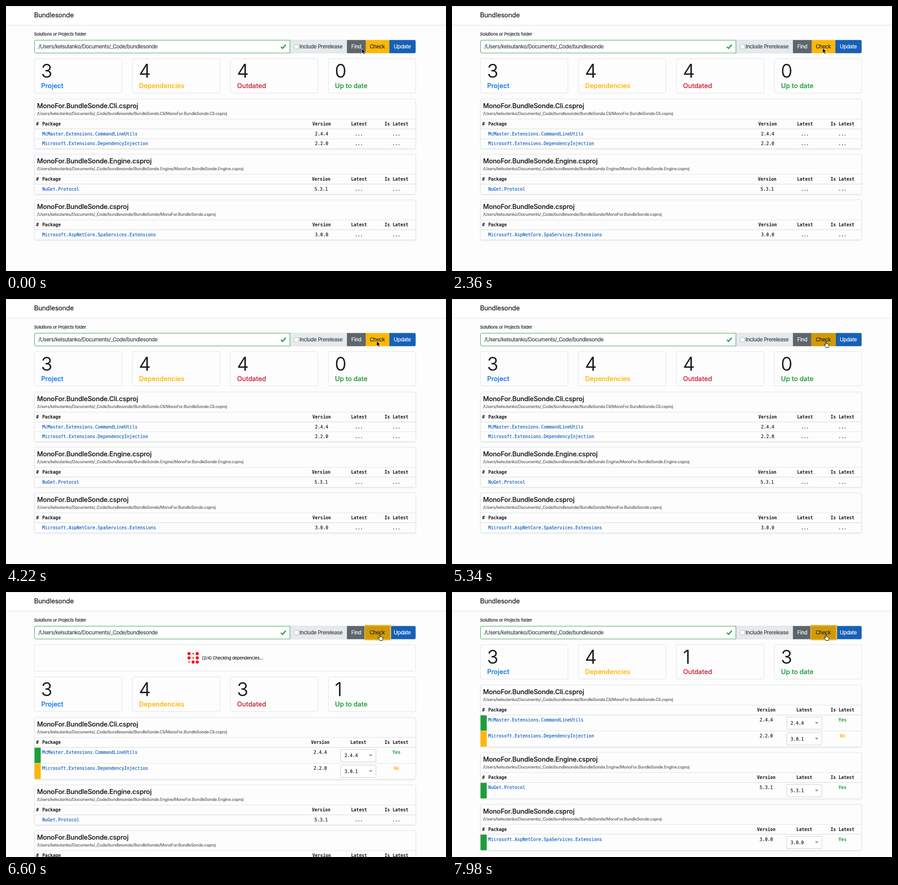
Animation, 964 px wide and 581 px high, one loop 8000 ms. Source, as an HTML page:

```html
<!DOCTYPE html>
<html lang="en">
<head>
<meta charset="utf-8">
<title>Bundlesonde</title>
<style>
html, body { margin: 0; width: 100%; height: 100%; overflow: hidden; background: #fdfdfd; }
svg { display: block; width: 964px; height: 581px; }
/* The hairline stroke gives the text the weight of smoothed screen type */
text {
  font-family: Inter, "Open Sans", sans-serif; white-space: pre;
  color: #16191d; fill: currentColor; stroke: currentColor; stroke-width: .2px;
}
.brand, .title, .name { font-size: 14.4px; letter-spacing: -.06px; }
.brand { letter-spacing: -.2px; }
.title { font-weight: 500; letter-spacing: -.12px; }
.name { font-weight: 500; letter-spacing: .02px; }
.small { font-size: 9.2px; letter-spacing: -.12px; }
.path { font-size: 9px; letter-spacing: -.17px; color: #596067; }
.ctl { font-size: 11.5px; letter-spacing: -.36px; color: #394047; }
.num { font-size: 41px; font-weight: 300; stroke-width: .4px; }
.mono { font-family: "DejaVu Sans Mono", monospace; font-size: 9.64px; }
.bold { font-weight: 700; stroke-width: 0; }
.mid { text-anchor: middle; }
.box { fill: none; stroke: #dee1e3; }
</style>
</head>
<body>
<svg viewBox="0 0 964 581">
  <defs>
    <filter id="soft" x="-5%" y="-20%" width="110%" height="150%">
      <feDropShadow dx="0" dy="1.5" stdDeviation="1.5" flood-opacity=".08"/>
    </filter>
  </defs>
  <rect width="964" height="581" fill="#fdfdfd"/>
  <g id="page"></g>
  <g id="spinner" fill="#fb0d14"></g>
  <g id="cursor">
    <path id="arrow" d="M0 0V11.6L2.7 9.1L4.6 13.3L6.6 12.4L4.7 8.3H8.3Z" fill="#000" stroke="#fff" stroke-width=".8"/>
    <path id="hand" d="M-.9 .9Q-.9 -.2 0 -.2T1 .9V4.6Q2.8 3.8 3.2 5Q4.7 4.4 5 5.6Q6.6 5.2 6.6 6.8V9Q6.5 10.3 5.6 11.3V13H0V11.7Q-2 9.8 -3.5 7.6Q-4 6.2 -2.7 6.2L-.9 7.5Z" fill="#fff" stroke="#000" stroke-width="1"/>
  </g>
</svg>
<script>
const LOOP = 8000, HOVER = 4700, CLICK = 6600, THIRD = 6940, DONE = 7240;
const GREEN = '#1f9d3c', AMBER = '#feb708', RED = '#c8283b', BLUE = '#0b74e5', LINK = '#0a5cbf', LINE = '#dee2e6';
const ROOT = '/Users/kelsutanko/Documents/_Code/bundlesonde/';
const BAR = { y: 74.5, h: 29 };
const projects = [
  { name: '.Cli', version: 691.5, packages: [
    ['McMaster.Extensions.CommandLineUtils', '2.4.4', '2.4.4'],
    ['Microsoft.Extensions.DependencyInjection', '2.2.0', '3.0.1']] },
  { name: '.Engine', version: 690.5, packages: [['NuGet.Protocol', '5.3.1', '5.3.1']] },
  { name: '', version: 691.5, packages: [['Microsoft.AspNetCore.SpaServices.Extensions', '3.0.0', '3.0.0']] }
];
const path = [[0, 779.5, 93], [820, 801, 90], [1500, 812, 92], [4400, 812, 92], [HOVER, 819, 93.5], [LOOP, 819, 93.5]];

const $ = id => document.getElementById(id);
const text = (x, y, str, cls, color) =>
  `<text x="${x}" y="${y}" class="${cls}"${color ? ` style="color:${color}"` : ''}>${str}</text>`;
const rect = (x, y, w, h, fill, extra = '') =>
  `<rect x="${x}" y="${y}" width="${w}" height="${h}" fill="${fill}" ${extra}/>`;
const box = (x, y, w, h) => `<rect x="${x}" y="${y}" width="${w}" height="${h}" rx="3" class="box"/>`;
const rule = (y, color = LINE) => rect(62.5, y, 835, 1, color);

function header() {
  return rect(0, -4, 964, 45, '#fff', 'filter="url(#soft)"') + rect(0, 0, 964, 1, '#dcdcdc') +
    rect(0, 41, 964, 1, '#ececec') +
    text(61.5, 25, 'Bundlesonde', 'brand') +
    text(61.5, 65, 'Solutions or Projects folder', 'small');
}

function toolbar(hover, focus) {
  const { y, h } = BAR, check = hover ? '#d09a08' : AMBER;
  return rect(622, y + .4, 125, h - .8, '#e7eaed', 'stroke="#ced4da" stroke-width=".8"') +
    `<path d="M622 ${y + .5}H65.5a3 3 0 0 0-3 3v${h - 7}a3 3 0 0 0 3 3H622Z" fill="#fff" stroke="#2fa14a"/>` +
    text(71, 93, ROOT.slice(0, -1), 'ctl') +
    `<path d="M602.3 89.3l3.6 3.6 7-8" fill="none" stroke="${GREEN}" stroke-width="2.4"/>` +
    rect(631.5, 84.5, 9.5, 9.5, '#fff', 'rx="2" stroke="#b4b7ba"') +
    text(643, 93, 'Include Prerelease', 'ctl') +
    rect(747, y, 41, h, '#5d666d') + text(756.5, 93, 'Find', 'ctl', '#fff') +
    `<path d="M840 ${y}h54.5a3 3 0 0 1 3 3v${h - 6}a3 3 0 0 1-3 3H840Z" fill="#1760b7"/>` +
    text(849.5, 93, 'Update', 'ctl', '#fff') +
    (focus ? rect(785.2, y - 2.4, 58.6, h + 4.8, '#e9bd4c', 'rx="2"') : '') +
    rect(hover ? 787 : 788, y, hover ? 54 : 52, h, check) +
    text(797, 93, 'Check', 'ctl', '#212529');
}

function stats(y, fresh) {
  const items = [[3, 'Project', BLUE], [4, 'Dependencies', AMBER], [4 - fresh, 'Outdated', RED], [fresh, 'Up to date', GREEN]];
  return items.map(([n, label, color], i) => {
    const x = 62.5 + i * 214.6;
    return box(x, y + .5, 191.5, 75.5) + text(x + 14.2, y + 42, n, 'num') + text(x + 14.5, y + 65, label, 'name', color);
  }).join('');
}

function row(y, [name, version, latest], checked, versionX) {
  const same = version === latest, base = y + 13.8;
  let out = text(79.4, base, name, 'mono', LINK) + text(versionX, base, version, 'mono mid');
  if (!checked) return out + text(773.2, base, '...', 'mono mid') + text(855.3, base, '...', 'mono mid');
  const color = same ? GREEN : AMBER;
  return out + rect(62.5, y, 13.5, 34, color) +
    rect(733.5, y + 3.5, 77, 27, '#fff', 'rx="1" stroke="#cbcfc4"') +
    text(741.8, y + 20.7, latest, 'mono') +
    `<path d="M795 ${y + 14.8}h8l-4 4.2z" fill="#999"/>` +
    text(855.5, base, same ? 'Yes' : 'No', 'mono bold mid', color);
}

function card(y, project, done) {
  const { name, packages } = project, checked = done > 0;
  const rowH = checked ? 34.5 : 21, height = 66.5 + packages.length * rowH;
  const file = `MonoFor.BundleSonde${name}.csproj`, head = y + 58;
  const versionX = checked ? 688.6 : project.version;
  let out = rect(62.5, y, 835, height, '#fdfdfd', `rx="3" stroke="${LINE}" filter="url(#soft)"`) +
    text(68, y + 20, file, 'title') +
    text(68, y + 35.4, `${ROOT}BundleSonde${name}/${file}`, 'path') +
    rule(y + 43.5) + rule(y + 65, '#d3d8dd') +
    text(66, head, '#', 'mono bold') + text(79.4, head, 'Package', 'mono bold') +
    text(versionX, head, 'Version', 'mono bold mid') +
    text(checked ? 772 : 773.4, head, 'Latest', 'mono bold mid') +
    text(855.6, head, 'Is Latest', 'mono bold mid');
  packages.forEach((p, i) => {
    const top = y + 66.5 + i * rowH;
    if (i) out += rule(top - 1);
    out += row(top, p, i < done, versionX);
  });
  return { out, height };
}

function page(hover, done, loading) {
  let y = 115, left = done;
  let out = header() + toolbar(hover, done > 0);
  if (loading) {
    out += box(62.5, y + .5, 835, 58) + text(429.5, 148.3, `[${done}/4] Checking dependencies...`, 'small');
    y += 71;
  }
  out += stats(y, Math.max(0, done - 1));
  y += 89;
  for (const p of projects) {
    const c = card(y, p, left);
    out += c.out;
    y += c.height + 12.5;
    left -= p.packages.length;
  }
  return out;
}

// Dots pulse at slightly different rates, with three small ones at the start
function spinner(t) {
  let out = '';
  for (let i = 0; i < 9; i++) {
    const small = i === 1 || i === 4 || i === 6;
    const phase = (t - CLICK) / (700 + i * 37 % 5 * 110) * Math.PI * 2;
    const r = 2.5 + (small ? -.9 : .9) * Math.cos(phase);
    out += `<circle cx="${401 + i % 3 * 9}" cy="${135.2 + Math.floor(i / 3) * 9.2}" r="${r.toFixed(2)}"/>`;
  }
  return out;
}

function pointer(t) {
  const i = path.findIndex((p, k) => k && t <= p[0]);
  const [t0, x0, y0] = path[i - 1], [t1, x1, y1] = path[i];
  const u = (t - t0) / (t1 - t0), k = u * u * (3 - 2 * u);
  return [x0 + (x1 - x0) * k, y0 + (y1 - y0) * k];
}

let shown = '';
function draw(t) {
  const hover = t >= HOVER, loading = t >= CLICK && t < DONE;
  const done = t < CLICK ? 0 : t < THIRD ? 2 : t < DONE ? 3 : 4;
  const key = [hover, done, loading].join();
  if (key !== shown) $('page').innerHTML = page(hover, done, loading);
  shown = key;
  $('spinner').innerHTML = loading ? spinner(t) : '';
  $('cursor').setAttribute('transform', `translate(${pointer(t).map(v => v.toFixed(2)).join()})`);
  $('arrow').style.display = hover ? 'none' : '';
  $('hand').style.display = hover ? '' : 'none';
}

const start = performance.now();
function tick() {
  draw((performance.now() - start) % LOOP);
  requestAnimationFrame(tick);
}
tick();
</script>
</body>
</html>
```
